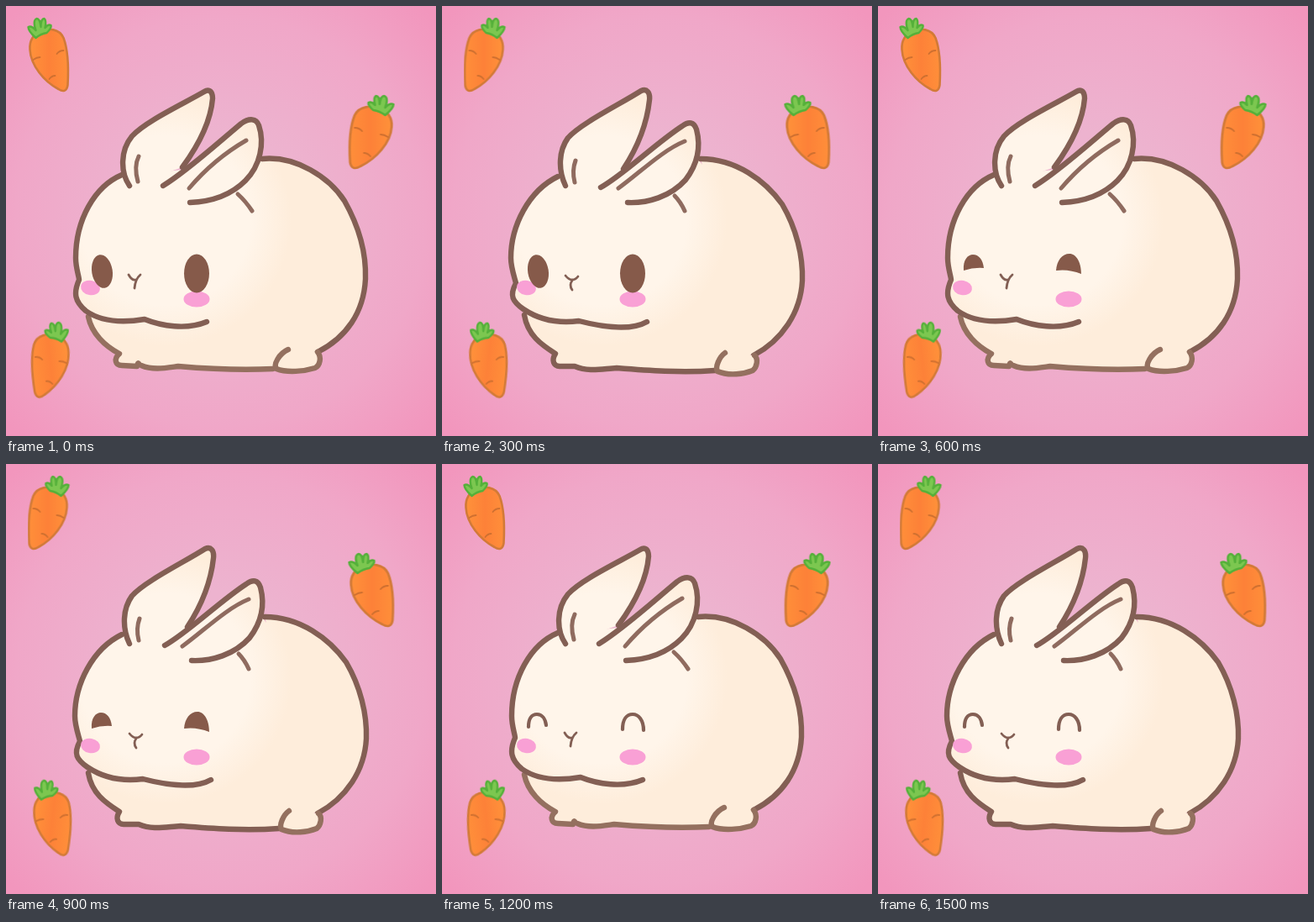
Animation of 512 by 512 pixels, one loop 1800 ms. Source, as an HTML page:

```html
<!DOCTYPE html>
<html lang="en">
<head>
<meta charset="utf-8">
<title>Bunny and carrots</title>
<style>
  html, body { margin: 0; height: 100%; overflow: hidden; background: #f0a6c6; }
  svg { display: block; width: 100vw; height: 100vh; }
  .art { filter: blur(.6px); }
  .line { fill: none; stroke: #835f54; stroke-width: 6.4; stroke-linecap: round; stroke-linejoin: round; }
  .skin { fill: url(#cream); }
  .soft { stroke: #94705f; }
  .fine { stroke-width: 5; stroke: #8f6b5f; }
  .nose { stroke-width: 2.8; }
  .lid { stroke-width: 4.2; }
  .solid { fill: #865a4a; }
</style>
</head>
<body>
<svg viewBox="0 0 512 512">
  <defs>
    <radialGradient id="sky" gradientUnits="userSpaceOnUse" cx="256" cy="256" r="350">
      <stop offset=".3" stop-color="#edb3cf"/>
      <stop offset=".7" stop-color="#f0a7c8"/>
      <stop offset="1" stop-color="#f296bd"/>
    </radialGradient>
    <radialGradient id="cream" gradientUnits="userSpaceOnUse" cx="190" cy="255" r="220">
      <stop offset=".46" stop-color="#fff5ea"/>
      <stop offset=".68" stop-color="#feeddb"/>
      <stop offset="1" stop-color="#feeddb"/>
    </radialGradient>
    <linearGradient id="peel">
      <stop offset="0" stop-color="#ff923a"/>
      <stop offset=".5" stop-color="#fd8138"/>
      <stop offset="1" stop-color="#ff8f3a"/>
    </linearGradient>
    <g id="carrot" stroke-linecap="round" stroke-linejoin="round">
      <path d="M-22 52C-23 41 -17 33 -10 30C0 26 13 27 18 38C24 54 24 76 23 94C22 101 18 103 12 99C-5 90 -21 71 -22 52Z"
        fill="url(#peel)" stroke="#d27a37" stroke-width="2.6"/>
      <path d="M10 57Q13 53 18 53M-18 64Q-14 61 -10 61M1 87Q4 83 8 83" fill="none" stroke="#cf7030" stroke-width="1.8"/>
      <path d="M-15 38Q-24 30 -24 25Q-20 23 -15 29Q-19 17 -14 15Q-10 15 -9 25Q-9 15 -5 15Q-2 17 -4 26Q0 21 3 23Q4 26 -2 32Q-9 33 -15 38Z"
        fill="#7cc750" stroke="#55b03a" stroke-width="2.4"/>
    </g>
  </defs>
  <rect width="512" height="512" fill="url(#sky)"/>
  <g class="art">
    <g id="carrots"></g>
    <g id="bunny"></g>
    <g fill="#f9a0d5">
      <ellipse cx="100.5" cy="335.5" rx="11.5" ry="8.7" transform="rotate(10 100.5 335.5)"/>
      <ellipse cx="227" cy="349" rx="15.5" ry="9.5"/>
    </g>
    <g id="eyes"></g>
  </g>
</svg>
<script>
const path = (kind, d) => `<path class="${kind}" d="${d}"/>`;
const torso = path('skin', 'M138 203L306 184L400 300L371 414L325 432L158 428L99 370Z');

// Each pose is a list of [classes, path], drawn back to front.
const poses = [
  [
    ['line skin', 'M305 182C345 178 385 204 403 232C420 262 429 295 428 325C426 365 405 395 371 412'],
    ['line skin soft', 'M98 370C102 390 118 405 135 414C128 420 130 428 138 428L156 429C158 422 157 427 161 428C175 434 190 431 205 429C240 432 280 434 318 432'],
    ['line skin soft', 'M336 409C325 414 318 427 322 432C335 437 355 435 368 431C374 428 376 418 371 412'],
    ['line skin', 'M138 201C105 215 83 255 83 300C83 312 87 322 87 326C80 342 82 352 95 363C112 375 135 378 165 373C185 381 215 386 239 376'],
    ['line skin', 'M147 214C136 198 136 172 150 155C165 138 210 117 236 102C242 98 246 102 246 110C244 135 232 162 210 192'],
    ['line skin', 'M187 214C215 197 250 165 280 140C290 133 298 134 301 142C308 163 303 190 285 208C268 225 245 233 219 234'],
    ['line fine', 'M158 179C154 187 154 198 157 209M218 217C235 197 255 178 286 160M276 224Q285 232 293 244'],
    ['line nose', 'M146 320Q150 327 154 326M160 320Q154 325 153 336']
  ],
  [
    ['line skin', 'M308 182C350 182 385 208 405 236C422 265 430 298 429 327C427 365 405 398 371 416'],
    ['line skin', 'M98 368C102 392 118 403 135 414C130 422 133 429 140 429L158 429C175 436 190 432 208 431C245 434 285 437 325 434'],
    ['line skin soft', 'M337 413C330 418 325 430 328 435C342 441 360 438 370 434C375 430 377 420 372 416'],
    ['line skin', 'M138 203C103 220 82 262 82 300C82 312 87 325 88 330C80 345 84 352 97 361C118 375 140 378 163 375C190 382 225 387 244 376'],
    ['line skin', 'M147 214C138 195 139 172 150 157C165 140 210 118 237 101C244 98 248 103 247 112C244 140 235 165 216 194'],
    ['line skin', 'M189 216C215 202 255 163 286 143C294 137 300 138 303 147C309 170 303 190 290 207C272 227 245 235 221 234'],
    ['line fine', 'M159 184C156 192 156 202 158 210M210 217C235 199 262 172 289 161M277 226Q284 233 289 244'],
    ['line nose', 'M147 321Q151 326 155 326Q159 326 162 322M155 327Q151 332 155 338']
  ]
].map(parts => torso + parts.map(p => path(...p)).join(''));

// Open, half closed, closed.
const eyes = [
  '<g class="solid"><ellipse cx="114.5" cy="316" rx="12.3" ry="20" transform="rotate(-9 114.5 316)"/>' +
    '<ellipse cx="227" cy="318.5" rx="15" ry="23"/></g>',
  path('solid', 'M102 315C101 302 107 296 113 296C120 296 125 302 126 312Q114 311 102 315Z' +
    'M212 315C213 303 219 295 228 295C236 295 242 305 242 319Q227 313 212 315Z'),
  path('line lid', 'M103 313C103 303 107 298 113 298C119 298 123 303 124 311' +
    'M215 316C215 304 220 298 227 298C234 298 240 305 240 317')
];

// x, y, horizontal scale, tilt, initial direction
const carrots = [[50.5, 0, 1, 0, 1], [435, 92, 1.1, 0, -1], [54, 363, 1, 6, -1]];

const show = (id, html) => document.getElementById(id).innerHTML = html;
let last = -1;

function draw(now) {
  const step = Math.floor(now / 300) % 6;
  if (step !== last) {
    const pose = step % 2;
    const flip = pose ? -1 : 1;
    show('carrots', carrots.map(([x, y, sx, tilt, dir]) =>
      `<use href="#carrot" transform="translate(${x} ${y}) scale(${sx * dir * flip} 1) rotate(${tilt} 0 65)"/>`).join(''));
    show('bunny', poses[pose]);
    show('eyes', eyes[step >> 1]);
    last = step;
  }
  requestAnimationFrame(draw);
}
draw(performance.now());
</script>
</body>
</html>
```
